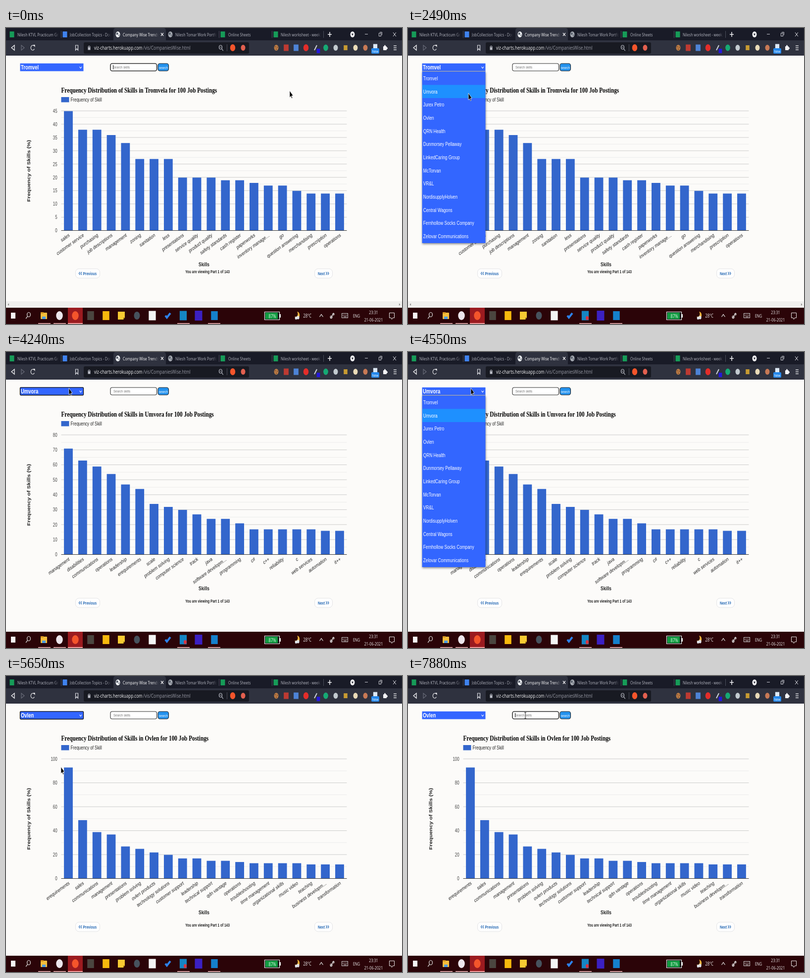
An HTML page with a canvas for the animation above (8 s loop, 800x600 px).

```html
<!DOCTYPE html>
<html lang="en">
<head>
<meta charset="utf-8">
<title>Skill chart demo</title>
<style>
html, body { margin: 0; width: 100%; height: 100%; overflow: hidden; background: #fcfbf9; }
canvas { display: block; width: 800px; height: 600px; }
</style>
</head>
<body>
<canvas id="stage" width="800" height="600"></canvas>
<script>
const ctx = document.getElementById('stage').getContext('2d');
const LOOP = 8000;
const SQUEEZE = 0.75; // the 16:9 screen is shown at 4:3
const ARIAL = '"Liberation Sans", Arial, sans-serif';
const SERIF = '"Liberation Serif", serif';
const UI = '"Open Sans", sans-serif';
const PAGE = '#fcfbf9', STRIP = '#191b27', BAR = '#2f323f', TASK = '#2b0408';

const companies = ['Tromvel', 'Umvora', 'Jurex Petro', 'Ovlen', 'QRN Health', 'Dunmorsey Pellaway',
  'LinkedCaring Group', 'McTorvan', 'VR&L', 'NordisupplyHolven', 'Central Wagons',
  'Fernhollow Socks Company', 'Zelovar Communications'];

const charts = [
  { pick: 0, name: 'Tromvela', max: 45, step: 5,
    values: [45, 38, 38, 36, 33, 27, 27, 27, 20, 20, 20, 19, 19, 18, 17, 17, 15, 14, 14, 14],
    labels: 'sales|customer service|purchasing|job descriptions|management|zoning|sanitation|less|presentations|service quality|product quality|safety standards|cash register|paperworks|inventory manage…|go|question answering|merchandising|prescription|operations' },
  { pick: 1, name: 'Umvora', max: 80, step: 10,
    values: [71, 63, 59, 54, 47, 44, 34, 32, 30, 27, 24, 24, 21, 17, 17, 17, 17, 17, 16, 16],
    labels: 'management|disabilities|communications|operations|leadership|erequirements|scale|problem solving|computer science|track|java|software developm…|programming|c#|c++|reliability|c|web services|automation|it++' },
  { pick: 3, name: 'Ovlen', max: 100, step: 20,
    values: [93, 49, 39, 37, 27, 25, 22, 20, 17, 17, 15, 15, 14, 13, 13, 13, 13, 12, 12, 12],
    labels: 'erequirements|sales|communications|management|presentations|problem solving|ovlen products|technology solutions|customer support|leadership|technical support|qdn vantage|operations|troubleshooting|time management|organizational skills|music video|teaching|business developm…|transformation' }
];

// Pointer path: time, x, y
const path = [[0, 573, 127], [465, 553, 127], [775, 553, 127], [1085, 200, 97], [1240, 155, 90],
  [1395, 132, 80], [2015, 132, 80], [2325, 122, 132], [3410, 122, 132], [3565, 180, 106], [3720, 203, 96],
  [4185, 127, 73], [4650, 127, 73], [4960, 111, 184], [5890, 111, 184], [6510, 237, 80]];

function rect(x, y, w, h, color) {
  ctx.fillStyle = color;
  ctx.fillRect(x, y, w, h);
}
function box(x, y, w, h, r, fill, stroke, width = 1) {
  ctx.beginPath();
  ctx.roundRect(x, y, w, h, r);
  if (fill) { ctx.fillStyle = fill; ctx.fill(); }
  if (stroke) { ctx.strokeStyle = stroke; ctx.lineWidth = width; ctx.stroke(); }
}
function square(x, y, h, color) {
  rect(x - h * SQUEEZE / 2, y - h / 2, h * SQUEEZE, h, color);
}
function oval(x, y, r, fill, stroke, from = 0, to = Math.PI * 2) {
  ctx.beginPath();
  ctx.ellipse(x, y, r * SQUEEZE, r, 0, from, to);
  if (fill) { ctx.fillStyle = fill; ctx.fill(); }
  if (stroke) { ctx.strokeStyle = stroke; ctx.lineWidth = 1.2; ctx.stroke(); }
}
function poly(points, fill, stroke, width = 1, close = true) {
  ctx.beginPath();
  points.forEach(([x, y]) => ctx.lineTo(x, y));
  if (close) ctx.closePath();
  if (fill) { ctx.fillStyle = fill; ctx.fill(); }
  if (stroke) { ctx.strokeStyle = stroke; ctx.lineWidth = width; ctx.stroke(); }
}
const line = (color, width, ...points) => poly(points, null, color, width, false);

function text(str, x, y, size, color, { font = ARIAL, weight = 400, align = 'left', turn = 0 } = {}) {
  ctx.save();
  ctx.translate(x, y);
  ctx.scale(SQUEEZE, 1);
  ctx.rotate(turn * Math.PI / 180);
  ctx.font = `${weight} ${size}px ${font}`;
  ctx.textAlign = align;
  ctx.fillStyle = color;
  ctx.fillText(str, 0, 0);
  ctx.restore();
}
const ui = (str, x, y, size, color, align) => text(str, x, y, size, color, { font: UI, align });

function magnifier(x, y, r, color, side) {
  oval(x, y, r, null, color);
  line(color, 1.2, [x + side * r * .55, y + r * .75], [x + side * r * 1.3, y + r * 1.8]);
}

function tabTitle(str, x, end, color, back) {
  ctx.save();
  ctx.beginPath();
  ctx.rect(x, 0, end - x, 25);
  ctx.clip();
  ui(str, x, 16.5, 9.4, color);
  const fade = ctx.createLinearGradient(end - 10, 0, end, 0);
  fade.addColorStop(0, back + '00');
  fade.addColorStop(1, back);
  rect(end - 10, 0, 10, 25, fade);
  ctx.restore();
}

function globe(x, color) {
  oval(x, 13, 6, color);
  poly([[x - 3, 10], [x, 9], [x + 1, 12], [x - 1, 14], [x - 3.5, 13]], '#59606c');
  poly([[x + 1, 14], [x + 3.5, 13], [x + 2, 17]], '#59606c');
}

function tabStrip() {
  rect(0, 0, 800, 25, STRIP);
  box(217, 0, 106, 26, [5, 5, 0, 0], BAR);
  for (const x of [111, 430, 537, 641]) rect(x, 6, 1, 14, '#4a4d5a');
  for (const x of [12, 438, 545]) square(x, 13, 12, '#169b58');
  square(119, 13, 12, '#3f82ee');
  globe(226, '#eef0f3');
  globe(332, '#a4a8b0');
  const dim = '#b4b6c0';
  tabTitle('Nilesh KTVL Practicum Grade', 23, 107, dim, STRIP);
  tabTitle('JobCollection Topics - Docs', 129, 212, dim, STRIP);
  tabTitle('Company Wise Trends', 236, 308, '#ffffff', BAR);
  tabTitle('Nilesh Tomar Work Portfolio', 342, 426, dim, STRIP);
  tabTitle('Online Sheets', 449, 532, dim, STRIP);
  tabTitle('Nilesh worksheet - week3', 555, 637, dim, STRIP);
  const w = '#f2f2f4';
  line(w, 1.2, [313, 10], [318, 16]);
  line(w, 1.2, [318, 10], [313, 16]);
  line(w, 1.5, [650, 13], [658, 13]);
  line(w, 1.5, [654, 8], [654, 18]);
  oval(700, 13, 6, w);
  poly([[698, 11.5], [702, 11.5], [700, 15.5]], STRIP);
  line('#c8c9d0', 1, [725, 12.5], [731, 12.5]);
  ctx.strokeStyle = '#c8c9d0';
  ctx.strokeRect(753.5, 10.5, 4, 6);
  line('#c8c9d0', 1, [755, 8.5], [759.5, 8.5], [759.5, 14.5]);
  line('#e0e0e6', 1, [782, 9], [788, 17]);
  line('#e0e0e6', 1, [788, 9], [782, 17]);
}

function toolbar() {
  rect(0, 25, 800, 31, BAR);
  const w = '#f2f2f4';
  poly([[17, 35], [17, 45], [11, 40]], null, w, 1.3);
  poly([[31, 35], [31, 45], [37, 40]], null, '#686b78', 1.2);
  oval(54, 40, 5, null, w, .5, 5.4);
  poly([[55, 34], [58.5, 34], [58.5, 39]], w);
  poly([[140.5, 35], [145.5, 35], [145.5, 45], [143, 42], [140.5, 45]], null, '#dcdde3', 1.2);
  box(157, 29, 334, 23, 3, '#181a22');
  box(165.5, 39, 5, 5.5, 0, '#b9bbc4');
  oval(168, 39, 2.5, null, '#b9bbc4', Math.PI, 0);
  ui('viz-charts.herokuapp.com', 178, 44, 10.8, '#f4f4f6');
  ui('/vis/CompaniesWise.html', 277, 44, 10.8, '#9a9ca7');
  magnifier(433.5, 39, 4, '#b9bbc4', 1);
  line('#b9bbc4', 1, [432, 39], [435, 39]);
  rect(446, 33, 1, 14, '#4a4d58');
  oval(458, 40, 7, '#f4552b');
  oval(479, 40, 6, '#e2604f');

  oval(546, 40, 6, '#b97a45');
  for (const [x, y] of [[544, 38], [548, 39], [546, 43]]) oval(x, y, 1, '#593219');
  square(566, 40, 13, '#bd3a32');
  square(586, 40, 13, '#4d83d6');
  oval(606, 40, 7, '#e32d2a');
  line('#cfd3dc', 2, [623, 45], [628, 35]);
  square(631, 46.5, 9, '#2418dc');
  oval(646, 40, 6.5, '#16a974');
  oval(666, 40, 6, '#c3cbd0');
  square(686, 40, 10, '#c79b32');
  oval(706, 40, 6, '#eadbb8');
  oval(726, 40, 6, '#c87955');
  square(746, 38, 11, '#dce8f5');
  box(738, 41, 16, 11, 2, '#2387ec');
  ui('New', 746, 49.5, 8, '#fff', 'center');
  box(762, 37, 7, 8, 1, w);
  oval(765.5, 36.5, 2, w);
  oval(769.5, 41, 2, w);
  for (const y of [36, 40, 44]) rect(783, y - .5, 6, 1.3, w);
}

function taskbar(t) {
  rect(0, 567, 800, 33, TASK);
  rect(125, 567, 30, 33, '#9b1b20');
  square(14.5, 583, 12, '#f5f5f5');
  magnifier(46, 581, 4.5, '#e8e8e8', -1);
  box(70, 577, 13, 13, 1, '#f3bd3d');
  rect(70, 576, 6, 3, '#d99820');
  rect(73, 585, 7, 5, '#4c9ce2');
  oval(108, 583, 9, '#ece6ec');
  oval(140, 583, 9, '#f4552b');
  square(171, 583, 18, '#4b4640');
  square(202, 583, 18, '#f6b90d');
  poly([[226, 575], [240, 575], [240, 587], [237, 591], [226, 591]], '#f7ca32');
  poly([[240, 587], [237, 587], [237, 591]], '#9b7416');
  oval(264.5, 583, 8, '#46525d');
  square(295.5, 583, 19, '#f4f4f4');
  line('#2d82eb', 4, [322, 583], [325, 587], [332, 578]);
  square(358, 583, 19, '#1586c4');
  if (t >= 490) oval(362, 588, 4, '#d93540');
  square(389, 583, 20, '#3b20c2');
  square(421, 583, 18, '#1580cc');
  for (const x of [65, 96, 346, 408]) rect(x, 598, 25, 2, '#c58f91');
  rect(125, 598, 30, 2, '#ee9c9c');

  box(522.5, 575.5, 30, 16, 0, '#111', '#f0f0f0', 1.2);
  rect(553, 580, 2, 7, '#f0f0f0');
  rect(524, 577, 25, 13, '#129c42');
  ui('87%', 538, 587.5, 10, '#d9f5df', 'center');
  oval(588, 582, 7, '#f2b43c');
  oval(585, 579.5, 6, TASK);
  oval(586, 588, 3, '#dfe2e8');
  oval(590, 587, 3.5, '#dfe2e8');
  const w = '#ececec';
  ui('28°C', 600.5, 587, 10, w);
  line(w, 1.2, [633.5, 585.5], [637, 580.5], [640.5, 585.5]);
  line(w, 1.3, [656, 588], [662, 578]);
  oval(657, 586, 2.5, null, w);
  oval(661.5, 580, 2, null, w);
  ctx.strokeStyle = '#cfcfcf';
  ctx.lineWidth = 1;
  ctx.strokeRect(678.5, 578.5, 12, 9);
  for (const y of [581, 583]) for (let x = 680; x < 690; x += 2) rect(x, y, 1, 1, '#cfcfcf');
  rect(682, 585, 6, 1, '#cfcfcf');
  ui('ENG', 701, 586.5, 9.2, w);
  ui('23:31', 742.5, 579.5, 9.6, w, 'center');
  ui('21-06-2021', 742.5, 594.5, 9.6, w, 'center');
  poly([[774.5, 577.5], [784.5, 577.5], [784.5, 587.5], [781, 587.5], [779.5, 590.5], [778, 587.5], [774.5, 587.5]], null, w);
}

function drawChart({ name, max, step, values, labels }) {
  const base = 410.5, height = 242.5;
  const yOf = v => base - v / max * height;
  text(`Frequency Distribution of Skills in ${name} for 100 Job Postings`, 111.5, 131, 15, '#000', { font: SERIF, weight: 700 });
  rect(111.5, 140, 16, 10.5, '#3366cc');
  text('Frequency of Skill', 130.5, 149, 10.6, '#222');
  for (let v = step / 2; v < max; v += step) rect(111.5, yOf(v) - .5, 577, 1, '#ececeb');
  for (let v = 0; v <= max; v += step) {
    rect(111.5, yOf(v) - .5, 577, 1, '#cccccb');
    text(v, 103.7, yOf(v) + 3.8, 10.6, '#444', { align: 'right' });
  }
  const names = labels.split('|');
  values.forEach((v, i) => {
    const x = 126 + i * 28.84, top = yOf(v) + .5;
    rect(x - 8.9, top, 17.8, base - top, '#3366cc');
    text(names[i], x + 3, 422, 10.8, '#222', { align: 'right', turn: -28.5 });
  });
  rect(111.5, base - .5, 577, 1, '#333');
  text('Frequency of Skills (%)', 48.7, 289.5, 11.4, '#222', { weight: 700, align: 'center', turn: -90 });
  text('Skills', 400, 483, 11.2, '#222', { weight: 700, align: 'center' });
}

function chevrons(x, y, dir) {
  for (const dx of [0, 3.5])
    line('#2468b4', 1.3, [x + dx - dir, y - 3], [x + dx + dir, y], [x + dx - dir, y + 3]);
}

function pager(shift) {
  const y = 497.5 + shift;
  box(140.5, y - 9.5, 49, 19, 7, '#fefefe', '#e4e4e6');
  box(623.5, y - 9.5, 36, 19, 7, '#fefefe', '#e4e4e6');
  chevrons(148.5, y, -1);
  text('Previous', 155.5, y + 3, 8.7, '#2468b4', { weight: 700 });
  text('Next', 630, y + 3, 8.7, '#2468b4', { weight: 700 });
  chevrons(647.5, y, 1);
  text('You are viewing Part 1 of 143', 407, 497 + shift, 8.7, '#222', { weight: 700, align: 'center' });
}

function searchBox(focused, caret) {
  box(211, 72, 93.5, 15, 3.5, '#fff', '#333', focused ? 1.6 : 1.1);
  text('Search skills', focused ? 216 : 217, 82.3, 8.1, '#757575');
  if (caret) rect(216, 75, 1, 9, '#222');
  box(307, 72, 21.5, 15, 4, '#2492ee', '#222', 1.1);
  text('search', 317.8, 82.5, 8, '#fff', { align: 'center' });
}

function select(pick, outlined) {
  box(28.5, 71.8, 128, 15.7, outlined ? 1.5 : 0, '#3366ff', outlined && '#111', 1.3);
  text(companies[pick], 30, 84, 12.6, '#fff', { weight: 700 });
  line('#fff', 1.1, [148.5, 78.5], [150.7, 81.5], [153, 78.5]);
}

function optionList(pick, pointer) {
  const top = 88.7, row = 26.65;
  ctx.save();
  ctx.shadowColor = 'rgba(0,0,0,.45)';
  ctx.shadowBlur = 4;
  ctx.shadowOffsetY = 2;
  rect(28.5, 87.5, 128, 348.5, '#3366ff');
  ctx.restore();
  rect(28.5, 87.2, 128, 1, '#c9b98f');
  const hover = pointer.y > top ? Math.floor((pointer.y - top) / row) : pick;
  rect(29, top + hover * row, 127, row, '#1e90ff');
  companies.forEach((name, i) => text(name, 30.8, top + (i + .5) * row + 4, 11, '#fff'));
}

function scrollbar() {
  rect(0, 554, 800, 13, '#f0f0ee');
  poly([[3.5, 560.5], [6, 558], [6, 563]], '#8a8a8a');
  poly([[796.5, 560.5], [794, 558], [794, 563]], '#8a8a8a');
}

function pointerAt(t) {
  const s = Math.floor(t / 155) * 155;
  const next = path.findIndex(p => p[0] > s);
  if (next < 0) return { x: 237, y: 80 };
  const [t0, x0, y0] = path[next - 1], [t1, x1, y1] = path[next];
  const k = (s - t0) / (t1 - t0);
  return { x: x0 + (x1 - x0) * k, y: y0 + (y1 - y0) * k };
}

function drawPointer({ x, y }) {
  if (x > 211 && x < 304 && y > 72 && y < 88) {
    line('#222', 1, [x, y - 6], [x, y + 6]);
    for (const d of [-6, 6]) line('#222', 1, [x - 2, y + d], [x + 2, y + d]);
    return;
  }
  const shape = [[0, 0], [0, 14], [2.4, 11.2], [4.2, 15.7], [5.8, 14.8], [4, 10.4], [7.2, 10.4]];
  poly(shape.map(([dx, dy]) => [x + dx, y + dy]), '#000', '#fff', .7);
}

function draw(t) {
  const chart = charts[t < 2940 ? 0 : t < 5650 ? 1 : 2];
  const open = (t >= 1850 && t < 2940) || (t >= 4550 && t < 5650);
  const searching = t < 1350 || t >= 6840;
  const caret = t < 490 || (t >= 820 && t < 1350) || (t >= 6840 && t < 7440) || t >= 7880;
  const pointer = pointerAt(t);

  rect(0, 0, 800, 600, PAGE);
  drawChart(chart);
  pager(t < 2940 ? 0 : 11);
  if (t < 2940) scrollbar();
  searchBox(searching, searching && caret);
  select(chart.pick, t >= 2940 && t < 6840 && !open);
  if (open) optionList(chart.pick, pointer);
  tabStrip();
  toolbar();
  taskbar(t);
  drawPointer(pointer);
}

const start = performance.now();
function tick(now) {
  draw(Math.max(0, now - start) % LOOP);
  requestAnimationFrame(tick);
}
draw(0);
requestAnimationFrame(tick);
</script>
</body>
</html>
```
